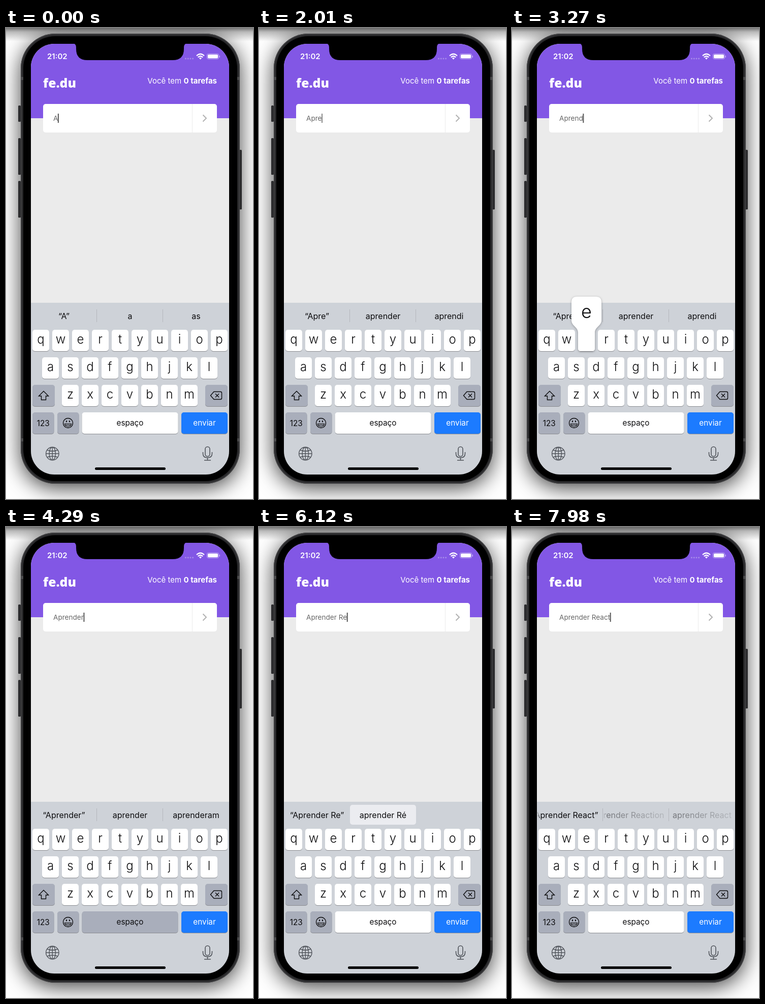
Write an HTML page with a canvas that moves like this. It is 486x924 px and loops after 8 s.

```html
<!DOCTYPE html>
<html lang="pt">
<head>
<meta charset="utf-8">
<title>Lista de tarefas</title>
<style>
html, body { margin: 0; width: 486px; height: 924px; overflow: hidden; background: #fff }
canvas { display: block }
</style>
</head>
<body>
<canvas width="486" height="924"></canvas>
<script>
const c = document.querySelector('canvas').getContext('2d');
const LOOP = 8000, FADE = 150;
const GRAY = '#a9aebb', INK = '#0c0c0e';

// [pressed, typed, character]
const strokes = [
  [90, 180, 'p'], [1110, 1170, 'r'], [1290, 1350, 'e'], [2070, 2130, 'n'],
  [2670, 2760, 'd'], [3240, 3300, 'e'], [3510, 3600, 'r'], [4290, 4380, ' '],
  [5400, 5460, 'R'], [5910, 5970, 'e'], [6510, 6570, 'a'], [7110, 7140, 'c'],
  [7440, 7500, 't']
];
const hints = [
  [0, '“A”', 'a', 'as'],
  [300, '“Ap”', 'após', 'apenas'],
  [1260, '“Apr”', 'apresentar', 'aprender'],
  [1560, '“Apre”', 'aprender', 'aprendi'],
  [2250, '“Apren”', 'aprender', 'aprendi'],
  [2880, '“Aprend”', 'aprender', 'aprendi'],
  [3310, '“Aprende”', 'aprender', 'aprendi'],
  [3780, '“Aprender”', 'aprender', 'aprenderam'],
  [4400, 'a', 'o', 'em'],
  [5490, '“Aprender R”', 'aprender Re', 'aprender Ri'],
  [5970, '“Aprender Re”', 'aprender Ré', ''],
  [6180, '“Aprender Re”', 'aprender Ré', 'aprender Rei'],
  [6690, '“Aprender Rea”', 'aprender Reação', 'aprender Real'],
  [7140, '“Aprender Reac”', 'aprender Reação', 'aprender Real'],
  [7590, '“Aprender React”', '', ''],
  [7930, '“Aprender React”', 'aprender Reaction', 'aprender React']
];
const blinks = [[840, 1110], [2010, 2130]];
const rows = [['qwertyuiop', 52], ['asdfghjkl', 71], ['zxcvbnm', 110]];

function box(x, y, w, h, r, fill) {
  c.beginPath();
  c.roundRect(x, y, w, h, r);
  c.fillStyle = fill;
  c.fill();
}

function text(str, x, y, size, fill, align = 'left', weight = 400) {
  c.font = `${weight} ${size}px Inter, sans-serif`;
  c.textAlign = align;
  c.fillStyle = fill;
  c.fillText(str, x, y);
  return c.measureText(str).width;
}

function line(d, color, width, fill) {
  const path = new Path2D(d);
  if (fill) { c.fillStyle = fill; c.fill(path); }
  c.strokeStyle = color;
  c.lineWidth = width;
  c.stroke(path);
}

function shadow(color, blur, dy) {
  c.shadowColor = color;
  c.shadowBlur = blur;
  c.shadowOffsetY = dy;
}

function phone() {
  c.fillStyle = '#fff';
  c.fillRect(0, 0, 486, 924);
  const top = c.createLinearGradient(0, 0, 0, 26);
  top.addColorStop(0, '#777');
  top.addColorStop(.3, '#bbb');
  top.addColorStop(1, '#fff');
  c.fillStyle = top;
  c.fillRect(0, 0, 486, 26);
  shadow('rgba(0,0,0,.75)', 42, 8);
  box(29, 11, 431, 883, 68, '#333');
  shadow('transparent', 0, 0);
  for (const [x, y, h] of [[24, 152, 32], [24, 216, 72], [24, 300, 72], [459, 239, 117]])
    box(x, y, 5, h, 1.5, '#2c2c2e');
  box(29, 11, 431, 883, 68, '#3d3d3f');
  box(31, 13, 427, 879, 66, '#29292b');
  for (const y of [96, 805]) {
    box(29, y, 5, 6, 0, '#4b4b4d');
    box(455, y, 5, 6, 0, '#4b4b4d');
  }
  box(34, 16, 421, 873, 63, '#000');
}

function header() {
  c.fillStyle = '#ebebeb';
  c.fillRect(49, 31, 390, 508);
  c.fillStyle = '#8257e5';
  c.fillRect(49, 31, 390, 146);
  line('M132 30Q138 31 138 38V41Q138 63 160 63H328Q350 63 350 41V38Q350 31 356 30Z', '#000', 0.1, '#000');

  text('21:02', 81, 61, 15, '#fff', 'left', 600);
  for (let i = 0; i < 4; i++) box(352 + i * 4.7, 58.5, 3, 3, 1.5, '#a78be9');
  line('M375 54.5Q382.5 47.5 390 54.5M377.7 57.5Q382.5 53 387.3 57.5', '#fff', 2.2);
  line('M380.2 59.2Q382.5 57.4 384.8 59.2L382.5 61.6Z', '#fff', .5, '#fff');
  line('M398.5 50.5H415.5Q418.5 50.5 418.5 53V58Q418.5 61 415.5 61H398.5Q395.5 61 395.5 58V53Q395.5 50.5 398.5 50.5Z', '#bca6f2', 1);
  box(397, 52, 20, 7.5, 1.8, '#fff');
  box(419.5, 54, 1.5, 4, 1, '#bca6f2');

  const logo = size => `condensed 800 ${size}px "Open Sans", sans-serif`;
  c.font = logo(32);
  c.font = logo(Math.min(32, 32 * 65 / c.measureText('fe.du').width));
  c.textAlign = 'left';
  c.fillStyle = '#fff';
  c.fillText('fe.du', 73, 117);
  const bold = text('0 tarefas', 415, 109, 15, '#fff', 'right', 700);
  text('Você tem', 410.5 - bold, 109, 15, '#fff', 'right');
}

function field(t) {
  box(73, 149, 342, 56, 5, '#fff');
  c.fillStyle = '#ebebeb';
  c.fillRect(366, 149, 1, 56);
  line('M387.5 170.5L394 177L387.5 183.5', '#b2b2b2', 2);

  const typed = 'A' + strokes.filter(s => s[1] <= t).map(s => s[2]).join('');
  const width = text(typed, 93, 182, 13.6, '#666');
  const blink = blinks.find(([from, to]) => t >= from && t < to);
  c.globalAlpha = blink ? Math.max(0, .7 - (t - blink[0]) / 150) : 1;
  c.fillStyle = '#555';
  c.fillRect(93 + width - .5, 168, 2, 18);
  c.globalAlpha = 1;
}

// Long labels keep their end in view and lose their start.
function hint(str, slot, from, to) {
  if (!str) return;
  const left = 49 + 130 * slot;
  c.font = '400 16px Inter, sans-serif';
  const width = c.measureText(str).width, long = width > 120;
  const x = long ? left + 120.5 - width : left + 65 - width / 2;
  const ink = a => `rgba(12,12,14,${a})`;
  const fill = c.createLinearGradient(left, 0, left + 130, 0);
  fill.addColorStop(0, ink(long ? 0 : from));
  fill.addColorStop(.06, ink(from));
  fill.addColorStop(1, ink(to));
  c.save();
  c.beginPath();
  c.rect(left, 540, 130, 50);
  c.clip();
  text(str, x, 570.5, 16, fill);
  c.restore();
}

function hintBar(t) {
  const i = hints.findLastIndex(h => h[0] <= t);
  const now = hints[i], before = hints[i - 1] || now;
  const p = i ? Math.min(1, (t - now[0]) / FADE) : 1;
  if (t >= 5970 && t < 7590) box(179, 545, 130, 39, 5, '#ebecf0');
  else for (const x of [178, 308]) box(x, 552, 1, 25, 0, '#b4b7bd');
  for (let slot = 0; slot < 3; slot++) {
    const str = now[slot + 1], old = before[slot + 1];
    if (str === old) hint(str, slot, 1, 1);
    else {
      if (p < 1) hint(old, slot, 1 - p, 1 - p);
      hint(str, slot, Math.min(1, 1.4 * p), p * p);
    }
  }
}

function key(x, y, w, fill) {
  box(x, y + 1, w, 42, 5, '#8a8c91');
  box(x, y, w, 42, 5, fill);
}

function popup(char) {
  const r = rows.findIndex(row => row[0].includes(char.toLowerCase()));
  const x = rows[r][1] + 39 * rows[r][0].indexOf(char.toLowerCase());
  const y = 592 + 54 * r, top = y - 65;
  const right = Math.min(x + 46, 437), left = right - 59;
  const d = `M${left + 11} ${top}H${right - 11}Q${right} ${top} ${right} ${top + 11}V${top + 46}
    C${right} ${top + 58} ${x + 33} ${top + 59} ${x + 33} ${top + 71}V${y + 37}
    Q${x + 33} ${y + 42} ${x + 28} ${y + 42}H${x + 5}Q${x} ${y + 42} ${x} ${y + 37}V${top + 71}
    C${x} ${top + 59} ${left} ${top + 58} ${left} ${top + 46}V${top + 11}Q${left} ${top} ${left + 11} ${top}Z`;
  shadow('rgba(0,0,0,.3)', 4, 1);
  c.fillStyle = '#fff';
  c.fill(new Path2D(d));
  shadow('transparent', 0, 0);
  text(char, (left + right) / 2, top + 42, 36, INK, 'center', 300);
}

function keyboard(t) {
  c.fillStyle = '#ced2d8';
  c.fillRect(49, 539, 390, 337);
  hintBar(t);

  const upper = t >= 4920 && t < 5520;
  const pressed = strokes.find(s => t >= s[0] && t < s[0] + (s[2] === ' ' ? 90 : 120));
  rows.forEach(([letters, x0], r) => [...letters].forEach((char, i) => {
    const x = x0 + 39 * i, y = 592 + 54 * r;
    key(x, y, 33, '#fff');
    text(upper ? char.toUpperCase() : char, x + 16.5, y + 27, upper ? 22.5 : 24, INK, 'center', 300);
  }));

  key(52, 700, 44, upper ? '#fff' : GRAY);
  line('M74 712.5L83.5 722H78.5V729.5H69.5V722H64.5Z', INK, 1.4, upper ? INK : '');
  key(392, 700, 44, GRAY);
  line('M409 713.5H422Q424.5 713.5 424.5 716V726Q424.5 728.5 422 728.5H409L402.5 721ZM412 717.5L419 724.5M419 717.5L412 724.5', INK, 1.4);

  key(52, 754, 42.5, GRAY);
  text('123', 73.2, 780.5, 15.3, INK, 'center');
  key(101, 754, 42.5, GRAY);
  line('M131.5 775A9.5 9.5 0 1 1 112.5 775A9.5 9.5 0 1 1 131.5 775Z', INK, 1.4);
  box(118, 770, 2, 3.6, 1, INK);
  box(124, 770, 2, 3.6, 1, INK);
  line('M115.5 776.5H128.5Q127.5 782 122 782Q116.5 782 115.5 776.5ZM117 779H127', INK, 1.2);
  key(149.5, 754, 189, pressed && pressed[2] === ' ' ? GRAY : '#fff');
  text('espaço', 244, 780, 15.3, INK, 'center');
  key(345, 754, 91, '#1c7bff');
  text('enviar', 390.5, 780, 15.3, '#fff', 'center');

  const gray = '#50545b';
  line('M104 835A12.7 12.7 0 1 1 78.6 835A12.7 12.7 0 1 1 104 835ZM97.5 835A6.2 12.7 0 1 1 85.1 835A6.2 12.7 0 1 1 97.5 835ZM91.3 822.3V847.7M78.6 835H104M81 828Q91.3 832 101.6 828M81 842Q91.3 838 101.6 842', gray, 1.4);
  line('M392 826A4.5 4.5 0 0 1 401 826V836A4.5 4.5 0 0 1 392 836ZM387.5 832V835Q387.5 843 396.5 843Q405.5 843 405.5 835V832M396.5 843V848M390 848H403', gray, 1.6);
  box(175, 862, 139, 5, 2.5, '#000');

  if (pressed && pressed[2] !== ' ') popup(pressed[2]);
}

function draw(now) {
  const t = now % LOOP;
  phone();
  c.save();
  c.beginPath();
  c.roundRect(49, 31, 390, 845, 46);
  c.clip();
  header();
  field(t);
  keyboard(t);
  c.restore();
  requestAnimationFrame(draw);
}
requestAnimationFrame(draw);
</script>
</body>
</html>
```
